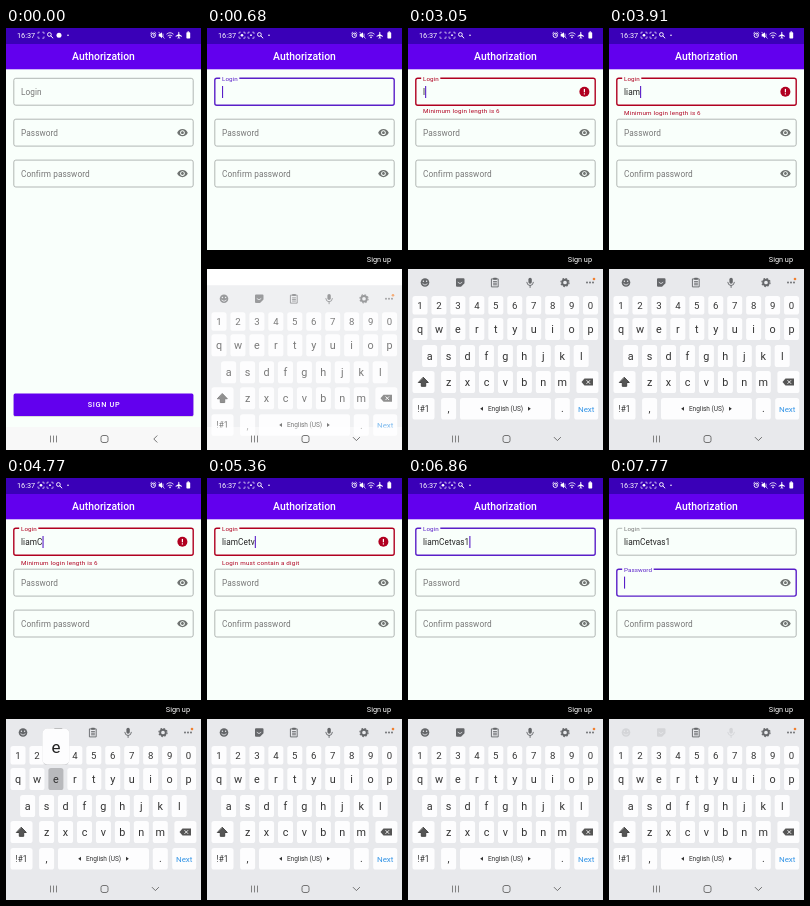
These frames come from a looping animation (195 by 422 pixels, 8 s). An HTML page:

```html
<!DOCTYPE html>
<html lang="en">
<head>
<meta charset="utf-8">
<title>Authorization form</title>
<style>
html, body { margin: 0; width: 100%; height: 100%; overflow: hidden; background: #f9fffb; }
svg { display: block; width: 100%; height: 100%; font-family: Roboto, Arial, sans-serif; }
</style>
</head>
<body>
<svg id="stage" viewBox="0 0 195 422"></svg>
<script>
const LOOP = 8000;
const PAPER = '#f9fffb', PURPLE = '#5a1fc8', RED = '#b00020', GRAY = '#777', LINE = '#a0a5a3', ICON = '#65676a';
const LOGIN = 'liamCetvas1';
// Press and release time of each typed character
const TAPS = [[2820, 2950], [3140, 3270], [3410, 3550], [3770, 3910], [4410, 4550], [4760, 4910],
  [4960, 5090], [5230, 5360], [5460, 5590], [5860, 6000], [6500, 6640]];
const SHIFT_ON = 4180, SHIFT_OFF = TAPS[4][1];
const FIRST = TAPS[0][1], SIXTH = TAPS[5][1], VALID = TAPS[10][1], NEXT_FIELD = 7500;

const stage = document.getElementById('stage');

function el(parent, tag, attrs, text) {
  const node = document.createElementNS('http://www.w3.org/2000/svg', tag);
  set(node, attrs);
  if (text !== undefined) node.textContent = text;
  parent.appendChild(node);
  return node;
}
function set(node, attrs) {
  for (const k in attrs) node.setAttribute(k, attrs[k]);
}
const group = (parent, attrs = {}) => el(parent, 'g', attrs);
const rect = (parent, x, y, width, height, fill, rx = 0) =>
  el(parent, 'rect', { x, y, width, height, fill, rx });
const circle = (parent, cx, cy, r, fill) => el(parent, 'circle', { cx, cy, r, fill });
const shape = (parent, d, fill) => el(parent, 'path', { d, fill });
const line = (parent, d, stroke, w = 1) =>
  el(parent, 'path', { d, stroke, 'stroke-width': w, fill: 'none', 'stroke-linecap': 'round', 'stroke-linejoin': 'round' });
const label = (parent, x, y, size, fill, text, more = {}) =>
  el(parent, 'text', { x, y, 'font-size': size, fill, ...more }, text);
const MID = { 'text-anchor': 'middle' };
const show = (node, on) => node.setAttribute('visibility', on ? 'visible' : 'hidden');
const ramp = (t, from, to) => Math.min(1, Math.max(0, (t - from) / (to - from)));
const easeOut = p => 1 - (1 - p) ** 2;
const smooth = p => p * p * (3 - 2 * p);
const mix = (a, b, p) => a + (b - a) * p;

// Page
rect(stage, 0, 0, 195, 422, PAPER);
rect(stage, 0, 16, 195, 25.3, '#6200ee');
rect(stage, 0, 0, 195, 16, '#3a00b8');
label(stage, 97.5, 32.3, 10.4, '#fff', 'Authorization', { ...MID, 'font-weight': 500 });

// Status bar
const status = group(stage);
label(status, 11, 10.2, 7.3, '#fff', '16:37');
function brackets(parent, x) {
  line(parent, `M${x - 3} 5.6v-1.4h1.4M${x + 1.6} 4.2h1.4v1.4M${x + 3} 8.8v1.4h-1.4M${x - 1.6} 10.2h-1.4v-1.4`, '#fff', .6);
}
brackets(status, 35);
const recDot = circle(status, 35, 7.2, 1.3, '#fff');
function magnifier(parent, x) {
  el(parent, 'circle', { cx: x - .6, cy: 6.5, r: 1.9, fill: 'none', stroke: '#fff', 'stroke-width': .9 });
  line(parent, `M${x + .9} 8l2 2`, '#fff', 1);
}
const iconsBefore = group(status), iconsAfter = group(status);
magnifier(iconsBefore, 44);
circle(iconsBefore, 53, 7.2, 2.5, '#fff');
brackets(iconsAfter, 44);
circle(iconsAfter, 44, 7.2, .9, '#fff');
magnifier(iconsAfter, 53);
circle(status, 62, 7.2, .8, '#fff');
// alarm, mute, wireless, airplane, battery
el(status, 'circle', { cx: 147.3, cy: 7.3, r: 2.2, fill: 'none', stroke: '#fff', 'stroke-width': .9 });
line(status, 'M147.3 6v1.4h1M144.6 5.2l1.2-1.1M150 5.2l-1.2-1.1', '#fff', .7);
shape(status, 'M152.7 6h1.3l2-1.8v6l-2-1.8h-1.3z', '#fff');
line(status, 'M152.8 4.2l5.4 6M157 6v2.4', '#fff', .7);
line(status, 'M160.8 6q3.2-2.8 6.4 0M162 7.7q2-1.6 4 0', '#fff', .8);
circle(status, 164, 9.4, .8, '#fff');
shape(status, 'M172.3 4.2q.5-.8 1 0v2l2.7 1.7v.8l-2.7-.8v1.5l.9.7v.5l-1.4-.4-1.4.4v-.5l.9-.7v-1.5l-2.7.8v-.8l2.7-1.7z', '#fff');
rect(status, 180.4, 4.2, 3.8, 6.2, '#fff', .7);
rect(status, 181.5, 3.4, 1.6, 1.2, '#fff');

// Outlined text fields
const EYE = 'M12 4.5C7 4.5 2.73 7.61 1 12c1.73 4.39 6 7.5 11 7.5s9.27-3.11 11-7.5c-1.73-4.39-6-7.5-11-7.5z' +
  'M12 17c-2.76 0-5-2.24-5-5s2.24-5 5-5 5 2.24 5 5-2.24 5-5 5z' +
  'm0-8c-1.66 0-3 1.34-3 3s1.34 3 3 3 3-1.34 3-3-1.34-3-3-3z';
function makeField(top, hint, eye) {
  const g = group(stage);
  const box = el(g, 'rect', { x: 7.8, y: top, width: 179.4, height: 26.9, rx: 2, fill: 'none' });
  const notch = rect(g, 13.2, top - 1.5, 0, 3, PAPER);
  const text = label(g, 15, 0, 8.25, GRAY, hint, { 'letter-spacing': '.009em' });
  if (eye) el(g, 'path', { d: EYE, fill: '#707472', transform: `translate(170.7 ${top + 7.7}) scale(.48)` });
  return (color, hintColor, weight, p) => {
    set(box, { stroke: color, 'stroke-width': weight });
    set(text, { y: top + mix(16.7, 2.3, p), 'font-size': mix(8.25, 6.25, p), fill: hintColor });
    notch.setAttribute('width', p ? (text.getComputedTextLength() + 3.4) * p : 0);
  };
}
const loginField = makeField(50.3, 'Login', false);
const passField = makeField(91.2, 'Password', true);
makeField(132.1, 'Confirm password', true)(LINE, GRAY, .8, 0);
const typed = label(stage, 15, 67, 8.25, '#222', '', { 'letter-spacing': '.009em' });
const cursor = rect(stage, 15, 58, 1.1, 12, PURPLE);
const errorIcon = group(stage);
circle(errorIcon, 176.4, 63.8, 5, RED);
rect(errorIcon, 175.8, 60.9, 1.2, 3.4, '#fff');
rect(errorIcon, 175.8, 65.3, 1.2, 1.2, '#fff');
const errorText = label(stage, 15, 86.6, 6.25, RED, '', { 'letter-spacing': '.033em' });

// Bottom of the page, before and after the keyboard
const button = group(stage);
rect(button, 7.6, 366, 179.8, 23, '#0002', 1.5);
rect(button, 7.6, 365.4, 179.8, 22.6, '#6200ee', 1.5);
label(button, 98, 379.4, 7.3, '#fff', 'SIGN UP', { ...MID, 'font-weight': 500, 'letter-spacing': '.089em' });
rect(button, 0, 399, 195, 23, '#f8f8f8');
const bar = group(stage);
rect(bar, 0, 222, 195, 19, '#000');
rect(bar, 0, 241, 195, 181, '#fff');
label(bar, 184, 234.4, 7.3, '#fff', 'Sign up', { 'text-anchor': 'end' });

// Keyboard
const board = group(stage);
rect(board, 0, 241, 195, 360, '#e8e9ec');
const dimmable = group(board);
circle(dimmable, 17, 254.5, 4.3, ICON);
circle(dimmable, 15.4, 253.2, .7, '#e8e9ec');
circle(dimmable, 18.6, 253.2, .7, '#e8e9ec');
line(dimmable, 'M14.8 256q2.2 2.4 4.4 0', '#e8e9ec', .8);
shape(dimmable, 'M49 250.3h6.5q1 0 1 1v4l-3.5 3.5h-4q-1 0-1-1v-6.500q0-1 1-1z', ICON);
line(dimmable, 'M50 254.5q2 2.500 4 0', '#e8e9ec', .8);
rect(dimmable, 120.4, 249.8, 3.4, 6, ICON, 1.7);
line(dimmable, 'M118.8 254.3q.3 3.200 3.300 3.200t3.300-3.200M122.100 257.500v2', ICON, .9);
line(board, 'M83.800 250.900h6.400v8h-6.400zM85.500 253.600h3M85.500 255.200h3M85.500 256.800h3', ICON, .9);
rect(board, 85.2, 249.7, 3.6, 2, ICON, .5);
el(board, 'circle', { cx: 157, cy: 254.5, r: 2.8, fill: 'none', stroke: ICON, 'stroke-width': 1.9 });
el(board, 'circle', { cx: 157, cy: 254.5, r: 4.1, fill: 'none', stroke: ICON, 'stroke-width': 1.1, 'stroke-dasharray': '1.61 1.61' });
for (let i = 0; i < 3; i++) circle(board, 179 + i * 3, 254.5, .9, ICON);
circle(board, 186, 251, 1.3, '#f08030');

const KEY = '#fdfdfe', keys = {}, letters = [];
function makeKey(cx, y, w, h, text, size, fill = '#333') {
  const face = rect(board, cx - w / 2, y, w, h, KEY, 2.6);
  const cap = label(board, cx, y + h / 2 + size * .35, size, fill, text, MID);
  return { cx, y, face, cap };
}
const ROWS = [['1234567890', 12, 268, 18.5, 9.6], ['qwertyuiop', 12, 290, 22, 10.8],
  ['asdfghjkl', 21.6, 317, 22, 10.8], ['zxcvbnm', 40.6, 343, 22, 10.8]];
for (const [chars, x0, y, h, size] of ROWS)
  [...chars].forEach((c, i) => {
    keys[c] = makeKey(x0 + 18.95 * i, y, 15, h, c, size);
    if (c > '9') letters.push(c);
  });
const shiftKey = makeKey(15.5, 343, 22, 22, '', 8);
const arrow = line(board, 'M15.500 349.500l4.800 5h-2.600v3.800h-4.400v-3.800h-2.600z', '#444', 1);
makeKey(179.4, 343, 22, 22, '', 8);
shape(board, 'M173.500 354l3-3.600h8.500v7.200h-8.500z', '#555');
line(board, 'M178.800 352.500l3 3M181.800 352.500l-3 3', '#fff', .9);
makeKey(15.5, 370, 22, 21.5, '!#1', 8.2);
makeKey(40.6, 370, 15, 21.5, ',', 10.5);
makeKey(97.5, 370, 91, 21.5, 'English (US)', 6.5);
shape(board, 'M75 378.800v4l-2.800-2zM120 378.800v4l2.800-2z', '#333');
makeKey(154.3, 370, 15, 21.5, '.', 10.5);
makeKey(178.2, 370, 24, 21.5, 'Next', 8, '#3394e6');

const popup = group(stage);
const bubbleShade = rect(popup, 0, 0, 27, 36.6, '#0002', 5);
const bubble = rect(popup, 0, 0, 27, 36, '#fdfdfe', 5);
const bubbleText = label(popup, 0, 0, 17, '#222', '', MID);

// Navigation bar
const navShade = rect(stage, 0, 399, 195, 23, '#fff');
line(stage, 'M44.500 408v6M47.500 408v6M50.500 408v6', '#666', .8);
el(stage, 'rect', { x: 95, y: 407.5, width: 7, height: 7, rx: 2, fill: 'none', stroke: '#666', 'stroke-width': .9 });
const back = line(stage, 'M151 407.800l-3.200 3.200 3.200 3.200', '#666', .9);

function cursorOn(t) {
  if (t < FIRST) return t >= 100 && !(t >= 820 && t < 1355) && !(t >= 1820 && t < 2320) && t < 2820;
  return !(t >= 6500 && t < VALID) && !(t >= 7180 && t < NEXT_FIELD);
}

function drawFields(t) {
  const count = TAPS.filter(tap => t >= tap[1]).length;
  const bad = t >= FIRST && t < VALID;
  const inPass = t >= NEXT_FIELD;
  const focused = t >= 50 && !inPass;
  const color = bad ? RED : focused ? PURPLE : LINE;
  loginField(color, focused ? color : GRAY, focused ? mix(.8, 1.4, ramp(t, 50, 180)) : .8, smooth(ramp(t, 50, 180)));
  const p = ramp(t, NEXT_FIELD, 7670);
  passField(inPass ? PURPLE : LINE, inPass ? PURPLE : GRAY, mix(.8, 1.4, p), smooth(p));

  typed.textContent = LOGIN.slice(0, count);
  const end = inPass || !count ? 0 : typed.getComputedTextLength();
  set(cursor, { x: 15 + end, y: inPass ? 98.6 : 58 });
  show(cursor, cursorOn(t));

  show(errorIcon, bad);
  show(errorText, bad);
  errorText.textContent = t < SIXTH ? 'Minimum login length is 6' : 'Login must contain a digit';
  const start = t < SIXTH ? FIRST : SIXTH;
  set(errorText, { y: 86.6 - 5 * (1 - easeOut(ramp(t, start, start + 217))), opacity: ramp(t, start - 30, start + 90) });
}

function drawKeyboard(t) {
  const p = ramp(t, 360, 820);
  const open = t >= 360;
  show(button, !open);
  show(bar, open);
  show(board, open);
  set(board, { transform: `translate(0 ${178 * (1 - p) ** 2})`, opacity: p ** 1.2 });
  show(navShade, open && p < 1);
  navShade.setAttribute('opacity', Math.min(1, 1.5 * (1 - p)));
  back.setAttribute('d', open ? 'M146.200 409.400l3.200 3.200 3.200-3.200' : 'M151 407.800l-3.200 3.200 3.200 3.200');
  dimmable.setAttribute('opacity', t >= 7580 ? .15 : 1);

  const upper = t >= SHIFT_ON && t < SHIFT_OFF;
  for (const c of letters) keys[c].cap.textContent = upper ? c.toUpperCase() : c;
  arrow.setAttribute('fill', upper ? '#3394e6' : '#555');
  shiftKey.face.setAttribute('fill', t >= 4090 && t < SHIFT_ON ? '#b8b9bc' : KEY);

  const i = TAPS.findIndex(([down, up]) => t >= down && t < up);
  const held = i < 0 ? null : keys[LOGIN[i].toLowerCase()];
  for (const c in keys) keys[c].face.setAttribute('fill', keys[c] === held ? '#b8b9bc' : KEY);
  show(popup, !!held);
  if (!held) return;
  const x = Math.min(164, Math.max(4, held.cx - 13.5)), y = held.y - 39.5;
  set(bubble, { x, y });
  set(bubbleShade, { x, y });
  set(bubbleText, { x: x + 13.5, y: y + 24 });
  bubbleText.textContent = LOGIN[i];
}

function draw(t) {
  show(recDot, Math.floor(t / 500) % 2 === 1);
  show(iconsBefore, t < 100);
  show(iconsAfter, t >= 100);
  drawFields(t);
  drawKeyboard(t);
}

const begin = performance.now();
function tick() {
  draw((performance.now() - begin) % LOOP);
  requestAnimationFrame(tick);
}
tick();
</script>
</body>
</html>
```
